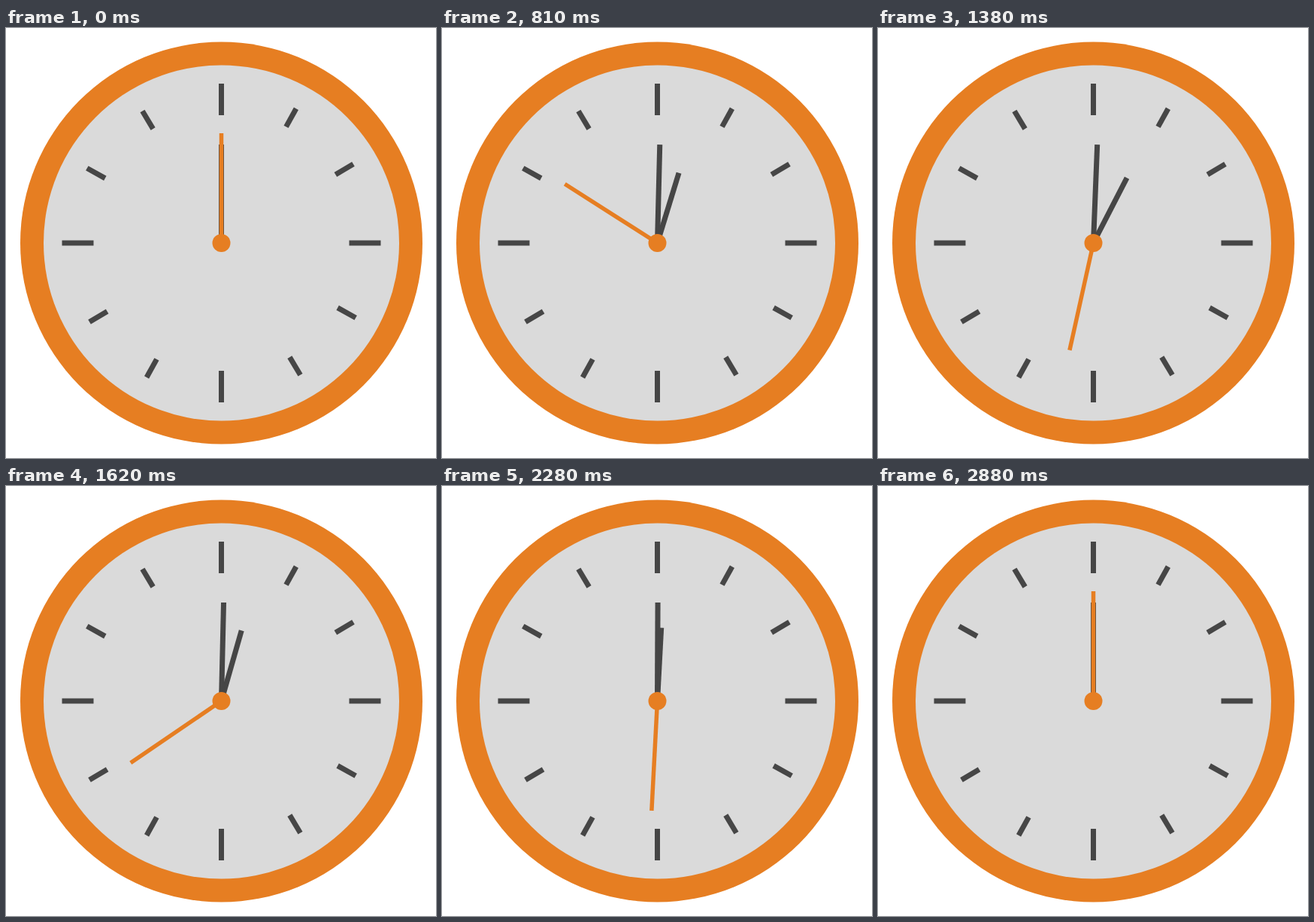
Animation, 572 px wide and 572 px high, one loop 2910 ms. Source, as an HTML page:

```html
<!DOCTYPE html>
<html lang="en">
<head>
<meta charset="utf-8">
<title>Clock</title>
<style>
  html, body { margin: 0; width: 100%; height: 100%; overflow: hidden; background: #fff; }
  svg { display: block; width: 572px; height: 572px; }
  .accent { fill: #e67e22; }
  .face { fill: #dadada; }
  .dark { fill: #464646; }
</style>
</head>
<body>
<svg viewBox="0 0 572 572">
  <g transform="translate(286.5 286)">
    <circle class="accent" r="267.5"/>
    <circle class="face" r="236.5"/>
    <g id="ticks" class="dark"></g>
    <rect id="short" class="dark" x="-3.5" y="-97.5" width="7" height="97.5"/>
    <rect id="long" class="dark" x="-3.5" y="-131" width="7" height="131"/>
    <rect id="sweep" class="accent" x="-2.75" y="-146" width="5.5" height="146"/>
    <circle class="accent" r="12"/>
  </g>
</svg>
<script>
  const LOOP = 2910, STEP = 30;
  const byId = id => document.getElementById(id);
  const turn = (el, deg) => el.setAttribute('transform', `rotate(${deg})`);

  // Quarter marks are long; the marks between them sit slightly early.
  for (let i = 0; i < 12; i++) {
    const quarter = i % 3 === 0;
    const tick = document.createElementNS('http://www.w3.org/2000/svg', 'rect');
    tick.setAttribute('x', -3.5);
    tick.setAttribute('y', quarter ? -212 : -204.5);
    tick.setAttribute('width', 7);
    tick.setAttribute('height', quarter ? 42 : 27.5);
    turn(tick, i * 30 - (quarter ? 0 : 0.9));
    byId('ticks').append(tick);
  }

  // Sweep hand: [time in ms, angle in degrees, speed in degrees per ms]
  const path = [
    [0, 0, 0], [330, 101.3, 0.82], [480, 270, 1.46], [810, 1022.5, 3.05],
    [1240, 1800, 0], [1380, 1632.5, -2.2], [1860, 447, -0.8],
    [2280, 183, -0.51], [2700, 21.4, -0.22], [2880, 0, 0]
  ];

  // Cubic Hermite interpolation along the path
  function sweepAngle(t) {
    const i = Math.max(1, path.findIndex(p => p[0] >= t));
    const [t0, a0, v0] = path[i - 1], [t1, a1, v1] = path[i];
    const d = t1 - t0, x = (t - t0) / d, y = 1 - x;
    return a0 * y * y * (1 + 2 * x) + a1 * x * x * (3 - 2 * x)
      + d * x * y * (v0 * y - v1 * x);
  }

  const start = performance.now();
  function draw() {
    const elapsed = Math.max(0, performance.now() - start) % LOOP;
    const angle = sweepAngle(Math.floor(elapsed / STEP) * STEP);
    turn(byId('sweep'), angle);
    turn(byId('short'), angle / 60);
    turn(byId('long'), angle / 720);
    requestAnimationFrame(draw);
  }
  draw();
</script>
</body>
</html>
```
